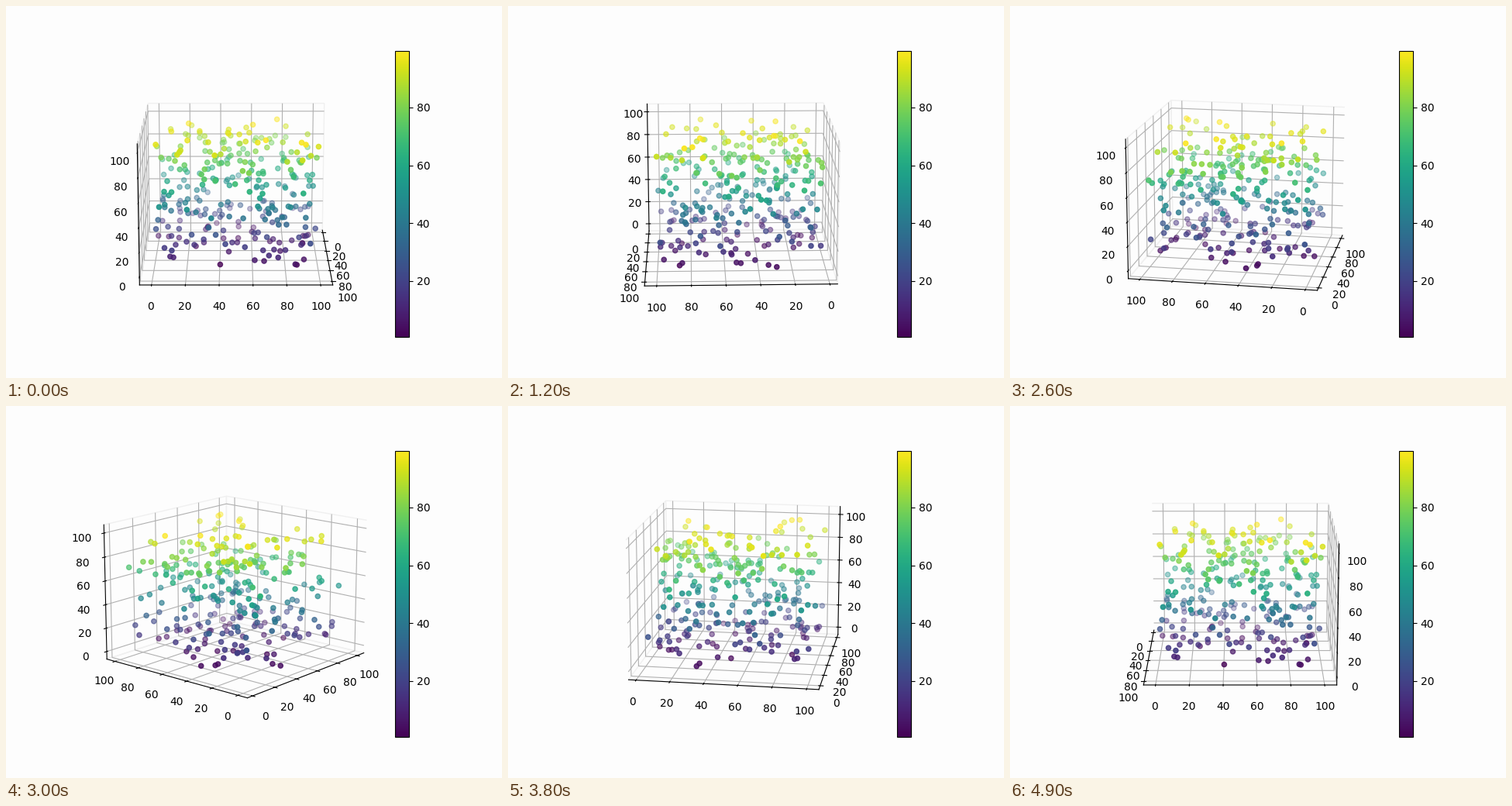
Animation of 640x480 px, one loop 5 s. Source, as a matplotlib script:

```python
import numpy as np
import matplotlib.pyplot as plt
from matplotlib.animation import FuncAnimation

FRAMES = 50
INTERVAL = 100
POINTS = 300
BACKGROUND = "#fdfdfd"

# Data range on each axis
LOW = np.array([2.6, .2, .66])
HIGH = np.array([99.9, 99.9, 99.66])

rng = np.random.default_rng(7)
x, y, z = rng.uniform(LOW, HIGH, (POINTS, 3)).T

fig = plt.figure(figsize=(6.4, 4.8), dpi=100, facecolor=BACKGROUND)
ax = fig.add_subplot(projection="3d", facecolor="none")
points = ax.scatter(x, y, z, c=z, cmap="viridis", vmin=LOW[2], vmax=HIGH[2])
fig.colorbar(points, ax=ax)

# 5 % data margin, then 1/48 of the widened range on each side
margin = (HIGH - LOW) * (.05 + 1.1 / 48)
xlim, ylim, zlim = zip(LOW - margin, HIGH + margin)
ticks = range(0, 101, 20)
ax.set(xticks=ticks, yticks=ticks, zticks=ticks)
ax.set(xlim=xlim, ylim=ylim, zlim=zlim)

for axis in (ax.xaxis, ax.yaxis, ax.zaxis):
    axis.pane.set_alpha(None)
    axis.pane.set_facecolor("none")
    axis.pane.set_edgecolor("#f0f0f0")

# One full turn; the tiny offset puts the side wall left at the start, right at the end
azimuths = np.linspace(1e-4, 360 - 1e-4, FRAMES)


def update(frame):
    ax.view_init(elev=15, azim=azimuths[frame])
    return (points,)


anim = FuncAnimation(fig, update, frames=FRAMES, interval=INTERVAL,
                     repeat=True, repeat_delay=0, blit=False)
plt.show()
```
